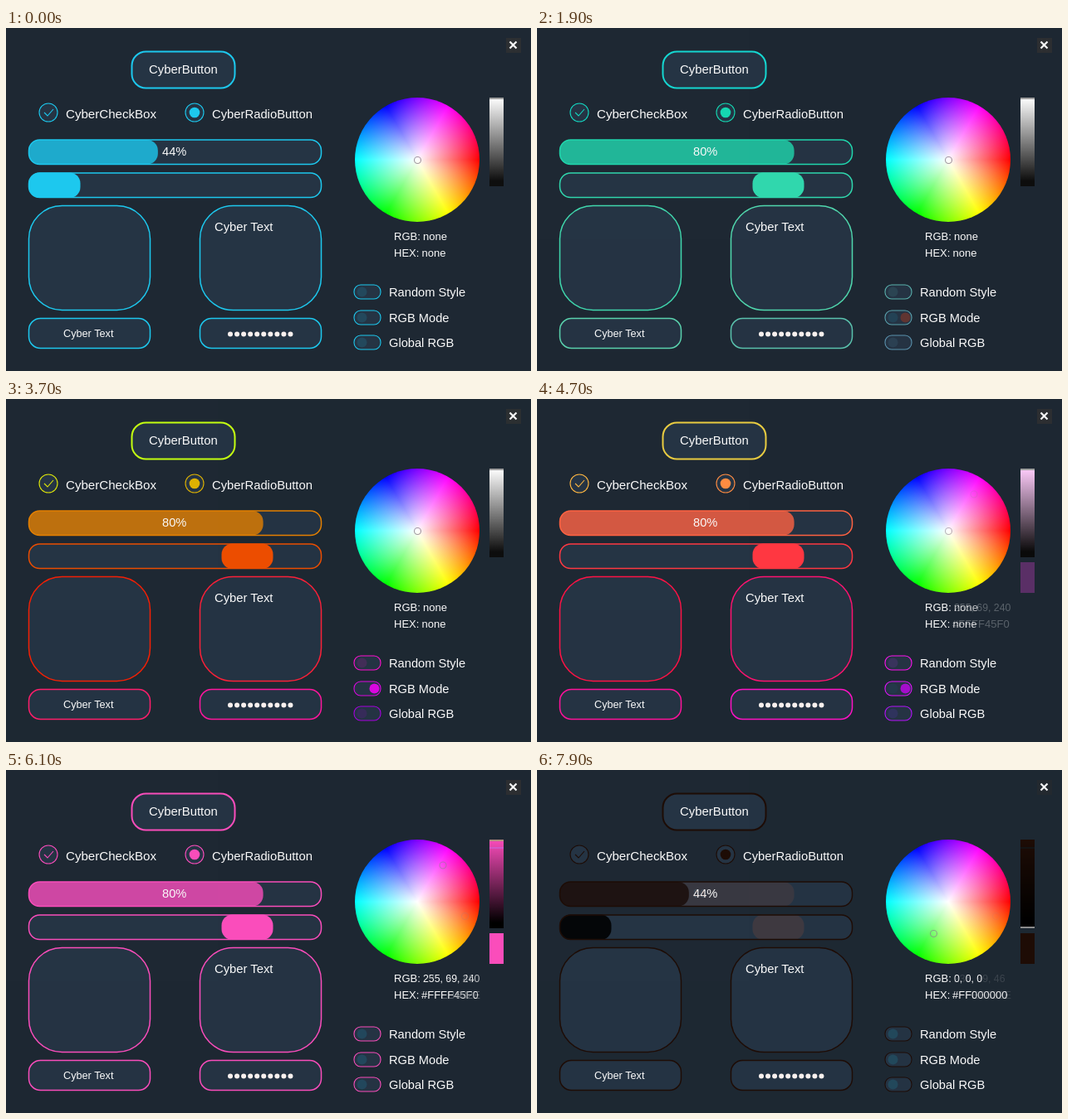
An HTML page for the animation above (8 s loop, 632 px wide and 414 px high).

```html
<!DOCTYPE html>
<html lang="en">
<head>
<meta charset="utf-8">
<title>Control gallery</title>
<style>
html, body { margin: 0; width: 100%; height: 100%; overflow: hidden; background: #1e2833; }
.layer { position: absolute; left: 0; top: 0; width: 632px; height: 414px; background: #1e2833; }
.wheel {
  position: absolute; left: 420px; top: 84px; width: 150px; height: 150px; border-radius: 50%;
  background:
    radial-gradient(closest-side, #fff, rgba(255, 255, 255, 0)),
    conic-gradient(from 90deg, #f00, #ff0, #0f0, #0ff, #00f, #f0f, #f00);
}
svg { position: absolute; left: 0; top: 0; }
text { font-family: "Liberation Sans", Arial, sans-serif; fill: #fafafa; white-space: pre; }
</style>
</head>
<body>
<script>
const LOOP = 8000, STEP = 100, STEPS = 10;
const PANEL = 'rgb(37,52,68)', CYAN = 'rgb(29,200,238)';

// One look per layer; every later layer fades in over the one before it.
const looks = [
  { at: 0, color: CYAN, value: 44, block: 28 },
  { at: 500, color: CYAN },
  { at: 1900, hue: 151 },
  { at: 3300, hue: 67 },
  { at: 4700, picked: [255, 69, 240], ring: [526, 115] },
  { at: 6100, picked: [235, 99, 46], ring: [552.5, 176.5], thumb: 93 },
  { at: 7500, picked: [0, 0, 0], ring: [477.5, 197.5], thumb: 189, value: 44, block: 28, close: '#23282f' }
];

const rect = (x, y, w, h, r, fill, more = '') =>
  `<rect x="${x}" y="${y}" width="${w}" height="${h}" rx="${r}" fill="${fill}" ${more}/>`;
const line = (color, width) => `stroke="${color}" stroke-width="${width}"`;
const disc = (x, y, r, fill, more = '') =>
  `<circle cx="${x}" cy="${y}" r="${r}" fill="${fill}" ${more}/>`;
const text = (x, y, size, s) => `<text x="${x}" y="${y}" font-size="${size}">${s}</text>`;
const hex = rgb => '#FF' + rgb.map(v => v.toString(16).padStart(2, '0')).join('').toUpperCase();

function toggle(y, label, color, on, dot) {
  return rect(419, y - 8.5, 32, 17, 8, PANEL, line(color, 1.1)) +
    (on ? disc(443.5, y, 6, color) : disc(428.5, y, 6, dot, 'fill-opacity=".14"')) +
    text(461, y + 5.5, 14.67, label);
}

function picker({ picked, ring = [495.5, 159.5], thumb = 84 }, id) {
  const color = picked ? `rgb(${picked})` : '#fff';
  let s = `<linearGradient id="g${id}" x2="0" y2="1"><stop stop-color="${color}"/>` +
    `<stop offset=".94" stop-color="${picked ? '#000' : '#0e0e0e'}"/></linearGradient>` +
    disc(...ring, 4, 'none', line('#8c7f8c', 1.1) + ' stroke-opacity=".8"') +
    rect(582, 84, 17, 107, 0, `url(#g${id})`) +
    rect(582, thumb, 17, 2, 0, '#a0a0a0');
  if (picked) s += rect(582, 197, 17, 37, 0, color);
  return s + text(467, 256, 13, 'RGB:') + text(467, 276, 13, 'HEX:') +
    (picked
      ? text(502, 256, 12.3, picked.join(', ')) + text(500, 276, 13, hex(picked))
      : text(502, 256, 13, 'none') + text(500.5, 276, 13, 'none'));
}

function scene(look, id) {
  const { hue, picked, value = 80, block = 260, close = '#2c2f32' } = look;
  const rainbow = hue !== undefined;
  const tint = i => rainbow ? `hsl(${(hue - i * 13.7 + 360) % 360},100%,50%)`
    : picked ? `rgb(${picked})` : CYAN;
  const frame = (i, x, y, w, h, r, width = 1.5) => rect(x, y, w, h, r, PANEL, line(tint(i), width));

  let s = frame(0, 151.5, 28.5, 124, 44, 17, 2) + text(172, 55, 14.9, 'CyberButton');

  s += disc(51, 102, 11, PANEL, line(tint(1), 1.1)) +
    `<path d="M46 102l4 4 7-8" fill="none" ${line(tint(1), 1.1)}/>` +
    text(72, 109, 15.1, 'CyberCheckBox');

  s += disc(227, 102, 11, PANEL, line(tint(2), 1.1)) + disc(227, 102, 6.3, tint(2)) +
    text(248, 109, 14.8, 'CyberRadioButton');

  s += rect(27.5, 135, 352, 29.5, 13, PANEL) +
    rect(27.5, 135, 352 * value / 100 + .5, 29.5, 13, tint(3), 'fill-opacity=".8"') +
    rect(27.5, 135, 352, 29.5, 13, 'none', line(tint(3), 1.5)) +
    text(188, 154, 14.67, value + '%');

  s += frame(4, 27.5, 175, 352, 29.5, 13) + rect(block - .5, 174.5, 62, 30.5, 13, tint(4));

  s += frame(5, 27.5, 214.5, 146, 126, 40) +
    frame(6, 233.5, 214.5, 146, 126, 40) + text(251, 245, 14.8, 'Cyber Text') +
    frame(7, 27.5, 350.5, 146, 36, 14) + text(69, 373, 12.7, 'Cyber Text') +
    frame(8, 233.5, 350.5, 146, 36, 14);
  for (let i = 0; i < 10; i++) s += disc(270 + i * 8.05, 369.5, 3, '#f8f0ee');

  ['Random Style', 'RGB Mode', 'Global RGB'].forEach((label, i) => {
    const color = tint(9 + i);
    s += toggle([318.5, 349.5, 379.5][i], label, color, rainbow && i === 1, rainbow ? color : CYAN);
  });

  s += rect(602, 12, 18, 18, 0, close) +
    `<path d="M606.5 16.5l8 8m0-8l-8 8" ${line('#fff', 2.2)}/>`;
  return s + picker(look, id);
}

// Cubic ease-out taken in 100 ms steps.
function fadeIn(start) {
  const easing = 'step-end';
  const steps = [{ offset: 0, opacity: 0, easing }];
  for (let k = 1; k <= STEPS; k++) {
    const offset = (start + (k - 1) * STEP) / LOOP;
    if (offset < 1) steps.push({ offset, opacity: 1 - (1 - k / STEPS) ** 3, easing });
  }
  steps.push({ offset: 1, opacity: steps[steps.length - 1].opacity });
  return steps;
}

looks.forEach((look, id) => {
  const layer = document.createElement('div');
  layer.className = 'layer';
  layer.innerHTML = `<div class="wheel"></div><svg width="632" height="414">${scene(look, id)}</svg>`;
  document.body.append(layer);
  if (id) {
    const fade = layer.animate(fadeIn(look.at), { duration: LOOP, iterations: Infinity });
    fade.startTime = 0;
  }
});
</script>
</body>
</html>
```
